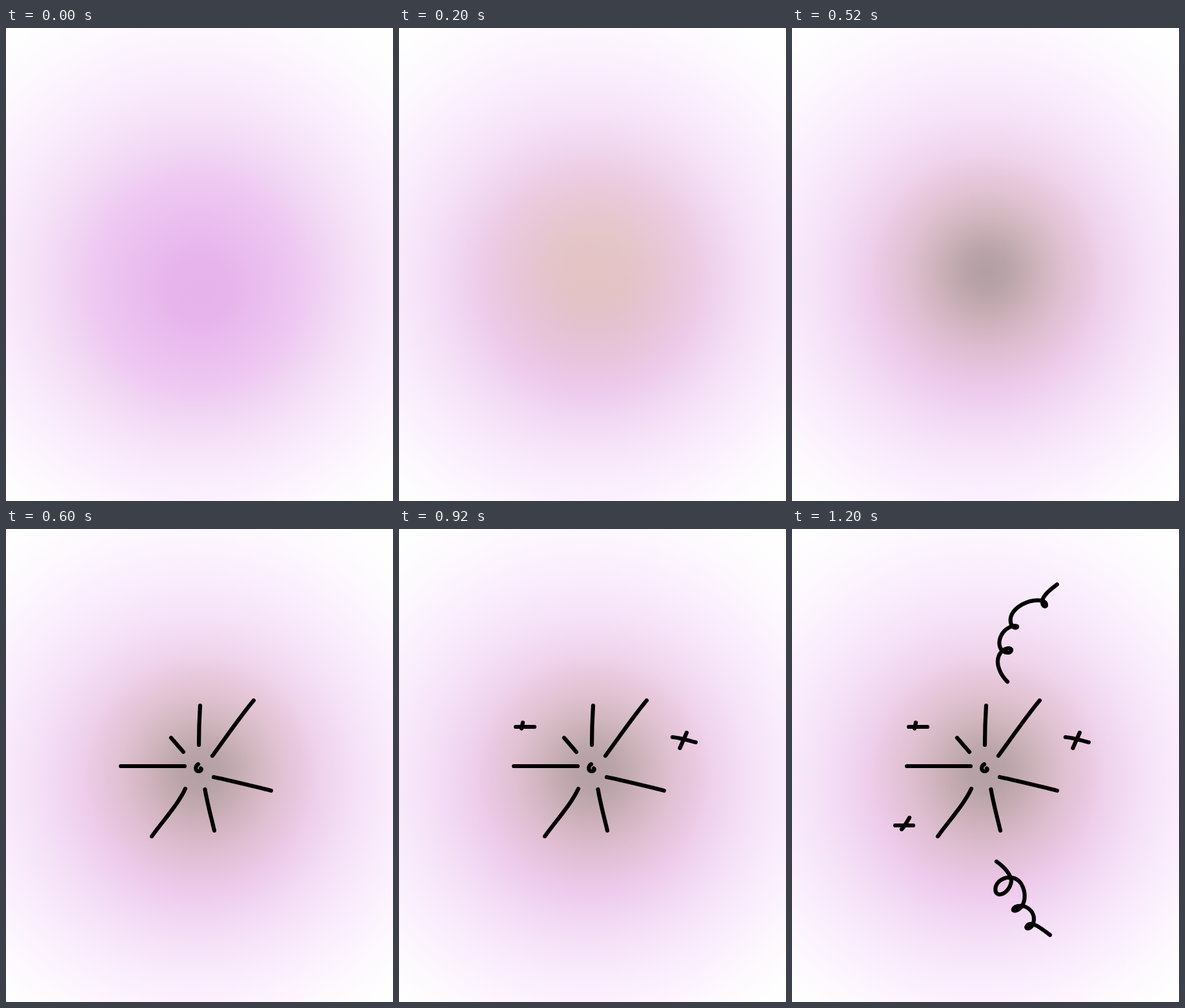
Animation, 600 px wide and 734 px high, one loop 1.4 s. Source, as an HTML page:

```html
<!DOCTYPE html>
<html lang="en">
<head>
<meta charset="utf-8">
<title>Spark</title>
<style>
  html, body { margin: 0; width: 100%; height: 100%; overflow: hidden; background: #fff; }
  svg { display: block; width: 100%; height: 100%; }
  .ink { fill: none; stroke: #000; stroke-width: 6.2; stroke-linecap: round; stroke-linejoin: round; }
</style>
</head>
<body>
<svg viewBox="0 0 600 734">
  <defs id="defs"></defs>
  <rect width="600" height="734" fill="url(#pink)"/>
  <rect data-from="200" width="600" height="734" fill="url(#sand)"/>
  <rect data-from="400" width="600" height="734" fill="url(#smoke)"/>

  <g class="ink" data-from="600">
    <path d="M178 368H277"/>
    <path d="M256 324L275 346"/>
    <path d="M301 274Q299 305 299 335"/>
    <path d="M384 266C363 291 342 322 320 352"/>
    <path d="M322 385C352 391 382 399 411 406"/>
    <path d="M308.500 404C312 425 318 447 323 468"/>
    <path d="M278 403C267 427 244 452 226 477"/>
    <path d="M298 365C293 368 293 375 298 376C302 376 304 373 302 371.500"/>
  </g>
  <g class="ink" data-from="800">
    <path d="M181 307H210M192 300.500L190 309.500"/>
    <path d="M424 323C436 324 448 328 460 331M446 316L435.500 340"/>
  </g>
  <g class="ink" data-from="1000">
    <path d="M160 460H188M182 448C178 455 175 461 170 466"/>
  </g>
  <g class="ink" data-from="1200">
    <path d="M411 86C399 95 388 104 388 113C388 121 395 122 394 117C392 108 372 109 357 117C341 126 336 138 340 148C343 155 350 154 349 151C345 148 331 153 325 164C319 175 321 186 328 190C335 194 341 191 340 187C338 183 326 185 321 196C315 209 323 226 334 237"/>
    <path d="M317 516C330 525 340 537 340 547C338 560 328 568 320 567C313 564 314 553 322 546C334 537 348 540 355 550C363 563 362 577 356 586C350 593 342 594 343 590C346 583 360 583 368 590C376 597 377 607 372 616C367 622 361 620 364 616C370 608 382 616 400 630"/>
  </g>
</svg>
<script>
  const LOOP = 1400;
  const defs = document.getElementById('defs');
  const layers = [...document.querySelectorAll('[data-from]')];

  // Each stop is [radius in px, colour, opacity].
  function glow(id, [cx, cy, r, fx = cx, fy = cy], stops) {
    const marks = stops.map(([at, color, alpha = 1]) =>
      `<stop offset="${at / r}" stop-color="${color}" stop-opacity="${alpha}"/>`).join('');
    defs.innerHTML += `<radialGradient id="${id}" gradientUnits="userSpaceOnUse"
      cx="${cx}" cy="${cy}" r="${r}" fx="${fx}" fy="${fy}">${marks}</radialGradient>`;
  }

  const fade = (color, steps) => steps.map(([at, alpha]) => [at, color, alpha]);

  glow('pink', [286, 379, 450, 303, 408], [
    [0, '#e6b3eb'], [50, '#e7b5ec'], [100, '#eabeef'], [168, '#efcaf2'],
    [205, '#f1d6f4'], [250, '#f5e1f7'], [320, '#faeefd'], [395, '#fdf9fe'], [450, '#fefefe']
  ]);
  glow('sand', [302, 375, 240], fade('#e0d49c', [
    [0, 0.5], [55, 0.46], [125, 0.27], [190, 0.07], [240, 0]
  ]));
  glow('smoke', [302, 377, 180], fade('#817a84', [
    [0, 0.5], [30, 0.44], [87, 0.2], [125, 0.08], [180, 0]
  ]));

  function draw() {
    const t = performance.now() % LOOP;
    for (const el of layers) {
      el.style.visibility = t >= +el.dataset.from ? 'visible' : 'hidden';
    }
    requestAnimationFrame(draw);
  }
  draw();
</script>
</body>
</html>
```
